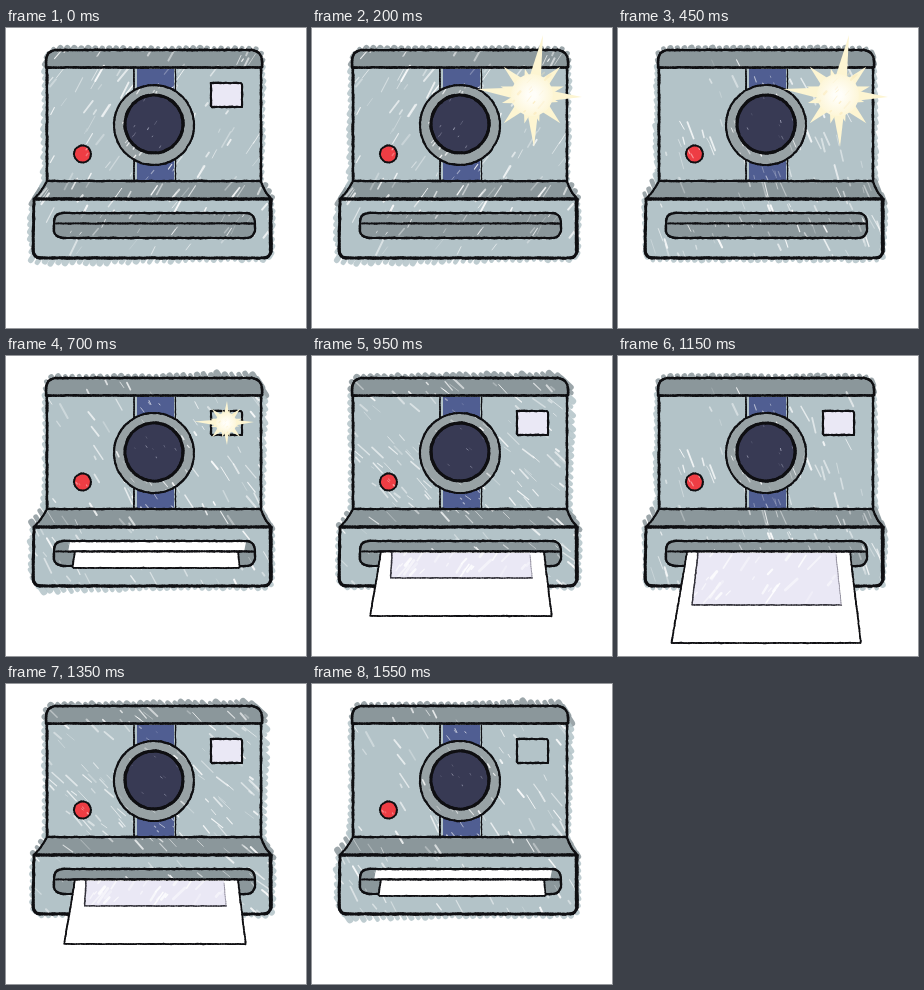
Write an HTML page with a canvas that moves like this. It is 300x300 px and loops after 1.75 s.

```html
<!DOCTYPE html>
<html lang="en">
<head>
<meta charset="utf-8">
<title>Instant camera</title>
<style>
html, body { margin: 0; width: 100%; height: 100%; overflow: hidden; background: #fff; }
canvas { display: block; width: 300px; height: 300px; }
</style>
</head>
<body>
<canvas id="stage"></canvas>
<script>
const canvas = document.getElementById('stage');
const scale = window.devicePixelRatio || 1;
canvas.width = canvas.height = 300 * scale;
const ctx = canvas.getContext('2d');

const INK = '#0f0f12', LIGHT = '#b3c3c8', GREY = '#8b979b', RIM = '#98a2a5',
      BLUE = '#505e92', NAVY = '#383a54', RED = '#ee3d44', LILAC = '#eae8f5', CREAM = '#fdf5d2';

const SILHOUETTE = 'M40 153V32Q41 22 51 22H246Q255 23 256 33L255 153L265 171V222Q265 229 258 230H35Q28 230 28 222V171Z';
const CAP = 'M40 39.5V32Q41 22 51 22H246Q255 23 256 33V39.5Z';
const SHOULDER = 'M41 153H255Q258 163 265 171H28Q36 163 41 153Z';
const BASE = 'M28 171L27 222Q28 230 35 230H258Q265 229 265 222V171Z';
const SLOT = 'M56 185H241Q249 186 249 196V202Q248 210 240 210H57Q48 209 48 202V195Q48 186 56 185Z';
const WINDOW = 'M205 55H236V79H205Z';
const BUTTON = circle(76.5, 126, 8.5);

// Colouring-in passes: spill is strongest around the lean angle (fold = number of strong sides)
const LOOKS = [
  { seed: 11, slant: -1, lean: 2.5, fold: 1, flecks: 150, glass: LILAC },
  { seed: 27, slant: 1.2, lean: 0, fold: 2, flecks: 110, glass: LILAC },
  { seed: 43, slant: 1, lean: -.7, fold: 2, flecks: 110, glass: LIGHT },
  { seed: 68, slant: .75, lean: -.8, fold: 1, flecks: 170, glass: LILAC }
];

// paper: lower edge of the sheet; flash: size
const STEPS = [
  { at: 0, look: 0 },
  { at: 200, look: 0, flash: 1 },
  { at: 450, look: 1, flash: 1 },
  { at: 700, look: 2, flash: .5, paper: 212 },
  { at: 950, look: 3, paper: 260 },
  { at: 1150, look: 1, paper: 287 },
  { at: 1350, look: 3, paper: 260 },
  { at: 1550, look: 2, paper: 212 }
];
const LOOP = 1750;

let seed = 1;
function rnd(a = 0, b = 1) {
  seed = (seed * 48271) % 2147483647;
  return a + (b - a) * seed / 2147483647;
}

function circle(x, y, r) {
  return `M${x - r} ${y}A${r} ${r} 0 1 1 ${x + r} ${y}A${r} ${r} 0 1 1 ${x - r} ${y}`;
}

function fill(d, color) {
  ctx.fillStyle = color;
  ctx.fill(new Path2D(d));
}

function inside(d, paint) {
  ctx.save();
  ctx.clip(new Path2D(d));
  paint();
  ctx.restore();
}

function segment(x1, y1, x2, y2, w, color) {
  ctx.strokeStyle = color;
  ctx.lineWidth = w;
  ctx.beginPath();
  ctx.moveTo(x1, y1);
  ctx.lineTo(x2, y2);
  ctx.stroke();
}

function pointsOn(d, gap) {
  const path = document.createElementNS('http://www.w3.org/2000/svg', 'path');
  path.setAttribute('d', d);
  const len = path.getTotalLength(), n = Math.ceil(len / gap);
  return Array.from({ length: n + 1 }, (_, i) => path.getPointAtLength(len * i / n));
}

// Crayon line: short pieces with slightly uneven width
function crayon(d, w, color = INK) {
  let last;
  for (const p of pointsOn(d, 2.5)) {
    const q = [p.x + rnd(-.2, .2), p.y + rnd(-.2, .2)];
    if (last) segment(...last, ...q, w * rnd(.85, 1.1), color);
    last = q;
  }
}

function streaks(x1, y1, x2, y2, count, slant, len, width, color = '#fff') {
  for (let i = 0; i < count; i++) {
    const x = rnd(x1, x2), y = rnd(y1, y2), a = slant + rnd(-.15, .15), l = len * rnd(.15, 1);
    ctx.globalAlpha = rnd(.25, .9);
    segment(x, y, x + Math.cos(a) * l, y + Math.sin(a) * l, width * rnd(.4, 1.3), color);
  }
  ctx.globalAlpha = 1;
}

// Fill strokes that run over the outline
function spill({ slant, lean, fold }) {
  ctx.globalAlpha = .85;
  for (const { x, y } of pointsOn(SILHOUETTE, 7)) {
    const side = Math.atan2(y - 126, x - 147);
    const l = 2 + 5 * Math.max(0, Math.cos(fold * (side - lean))) * rnd(.4, 1.1);
    const dx = Math.cos(slant) * l, dy = Math.sin(slant) * l;
    const grey = y < 40 || (y > 153 && y < 171);
    segment(x - dx, y - dy, x + dx, y + dy, rnd(4, 7), grey ? GREY : LIGHT);
  }
  ctx.globalAlpha = 1;
}

function lens(slant) {
  const stripe = 'M131 41H168V153H131Z';
  fill('M128 41H170V153H128Z', LIGHT);
  fill(stripe, BLUE);
  inside(stripe, () => streaks(130, 42, 168, 152, 26, slant, 8, 1.2));
  crayon('M128 41V153', 1.7);
  crayon('M169.5 41V153', 1.3);

  const outer = circle(148, 97, 40), inner = circle(148, 96, 29);
  fill(outer, RIM);
  inside(outer, () => streaks(108, 57, 188, 137, 34, slant, 8, 1.3));
  fill(inner, NAVY);
  inside(inner, () => streaks(120, 68, 176, 124, 10, slant, 4, .8, '#aeb0c4'));
  crayon(outer, 2.1);
  crayon(inner, 3.1);
}

function camera(look, paper) {
  const { slant } = look;
  seed = look.seed * 7919;
  spill(look);
  fill(SILHOUETTE, LIGHT);
  fill(CAP, GREY);
  fill(SHOULDER, GREY);
  inside(SILHOUETTE, () => streaks(26, 20, 264, 228, look.flecks, slant, 18, 1.6));
  lens(slant);

  fill(BUTTON, RED);
  inside(BUTTON, () => streaks(70, 119, 82, 130, 3, slant, 5, 1.2, '#ffc4c4'));
  fill(WINDOW, look.glass);
  fill(SLOT, GREY);
  inside(SLOT, () => streaks(50, 186, 247, 208, 22, slant, 10, 1.3));
  if (paper === 212) fill('M64 186H240L238 196H62Z', '#fff');

  seed = 5003;
  crayon(BUTTON, 1.9);
  crayon(WINDOW, 2.2);
  crayon(CAP, 2.5);
  crayon('M41 40V153', 2.7);
  crayon('M255 40V153', 2.5);
  crayon(SHOULDER, 2.3);
  crayon(BASE, 3);
  crayon('M264.5 173V222', 3.3);
  crayon(SLOT, 2.3);
  crayon('M50 195.5H248', 2);
}

function sheet(bottom) {
  const left = y => 69 - (y - 196) * .17, right = y => 232 + (y - 196) * .12;
  fill(`M${left(196)} 196H${right(196)}L${right(bottom)} ${bottom}H${left(bottom)}Z`, '#fff');
  const end = bottom - 38;
  if (end > 196) {
    const l = left(end) + 14, r = right(end) - 15;
    const photo = `M80 197H218L${r} ${end}H${l}Z`;
    fill(photo, LILAC);
    inside(photo, () => streaks(70, 198, 226, end, 30, -.9, 18, 2.2));
    crayon(`M80 197L${l} ${end}H${r}`, 1.5, '#33323a');
    crayon(`M218 199L${r} ${end}`, .8, '#8d8a99');
  }
  crayon(`M69 196L${left(bottom)} ${bottom}H${right(bottom)}L232 196`, 1.8);
  crayon('M66 195.5H236', 2);
}

function spike(x, y, half) {
  const d = Math.hypot(x, y), nx = -y / d * half, ny = x / d * half;
  ctx.beginPath();
  ctx.moveTo(nx, ny);
  ctx.lineTo(x, y);
  ctx.lineTo(-nx, -ny);
  ctx.fill();
}

function flash(size) {
  ctx.save();
  ctx.translate(220, 67);
  ctx.scale(size, size);
  ctx.fillStyle = CREAM;
  // long cross; the large burst leans to the right at the top
  const cross = size === 1 ? [[11, -60], [50, 2], [2, 52], [-55, -6]] : [[2, -44], [56, -2], [2, 44], [-64, -3]];
  cross.forEach(([x, y]) => spike(x, y, 8));
  seed = 907;
  for (let i = 0; i < 12; i++) {
    const a = i * Math.PI / 6 + .26, r = i % 3 === 1 ? 40 : rnd(27, 33);
    spike(Math.cos(a) * r, Math.sin(a) * r, 9);
  }
  const glow = ctx.createRadialGradient(0, 0, 4, 0, 0, 24);
  glow.addColorStop(0, '#fffef9');
  glow.addColorStop(1, CREAM);
  fill(circle(0, 0, 21), glow);
  streaks(-20, -20, 18, 20, 14, -.8, 9, 2, '#fbecc0');
  ctx.restore();
}

function draw({ look, flash: size, paper }) {
  ctx.setTransform(scale, 0, 0, scale, 0, 0);
  ctx.fillStyle = '#fff';
  ctx.fillRect(0, 0, 300, 300);
  ctx.lineCap = ctx.lineJoin = 'round';
  camera(LOOKS[look], paper);
  if (paper) sheet(paper);
  if (size) flash(size);
}

let shown, start;
function tick(now) {
  start ??= now;
  const t = Math.max(0, now - start) % LOOP;
  const step = STEPS.findLast(s => s.at <= t);
  if (step !== shown) draw(shown = step);
  requestAnimationFrame(tick);
}
draw(shown = STEPS[0]);
requestAnimationFrame(tick);
</script>
</body>
</html>
```
